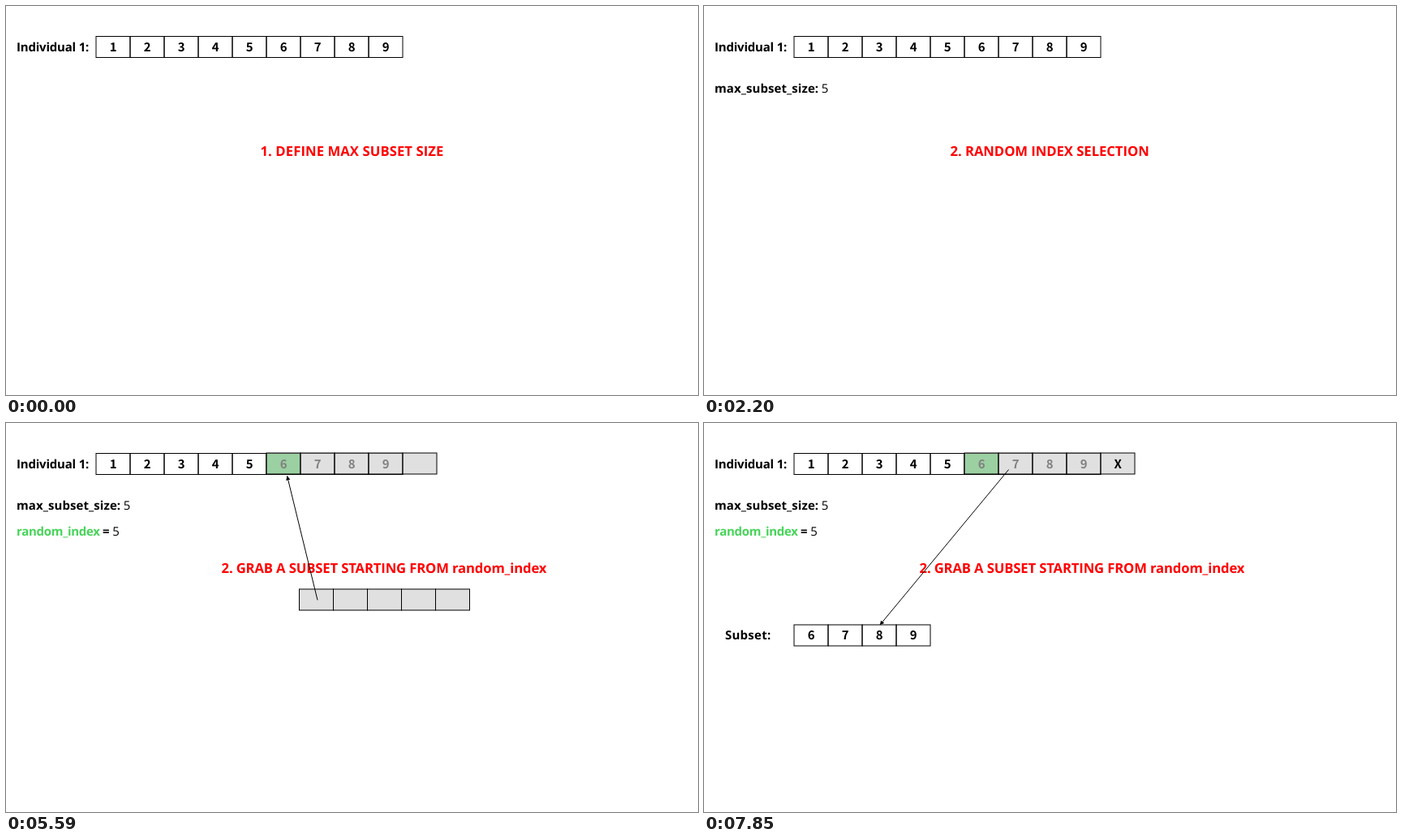
An HTML page that plays this animation: 853 by 480 pixels, repeating every 8 s.

```html
<!DOCTYPE html>
<html lang="en">
<head>
<meta charset="utf-8">
<title>Subset selection</title>
<style>
  html, body { margin: 0; width: 100%; height: 100%; overflow: hidden; background: #fff; }
  svg { display: block; width: 100%; height: 100%; }
  text { font: 700 15px "Open Sans", "Noto Sans", sans-serif; text-rendering: geometricPrecision; }
  .value { font-weight: 400; }
  .digit { font: 700 15px "Noto Sans CJK JP", "Noto Sans CJK SC", "Noto Sans CJK", sans-serif; text-anchor: middle; }
  .title { font-size: 16.7px; fill: #f00; }
  .index { fill: #47d459; letter-spacing: -.3px; }
  .cell { fill: none; stroke: #000; stroke-width: 1; }
  .veil .cell { fill: rgba(206, 206, 206, .627); }
  .arrow { stroke: #000; stroke-width: 1; marker-end: url(#head); }

  .step { visibility: hidden; animation: 8s step-end infinite; }
  .define { animation-name: define; }
  .size { animation-name: size; }
  .random { animation-name: random; }
  .picked { animation-name: picked; }
  .grab { animation-name: grab; }
  .window { animation-name: window; }
  .cover { animation-name: cover; }
  .point { animation-name: point; }
  .overflow { animation-name: overflow; }
  .result { animation-name: result; }

  @keyframes define { 0% { visibility: visible } 27.5%, 100% { visibility: hidden } }
  @keyframes size { 0% { visibility: hidden } 13.375%, 100% { visibility: visible } }
  @keyframes random { 0%, 55.75%, 100% { visibility: hidden } 27.5% { visibility: visible } }
  @keyframes picked { 0% { visibility: hidden } 41.625%, 100% { visibility: visible } }
  @keyframes grab { 0% { visibility: hidden } 55.75%, 100% { visibility: visible } }
  @keyframes window { 0%, 84%, 100% { visibility: hidden } 55.75% { visibility: visible } }
  @keyframes cover { 0% { visibility: hidden } 69.875%, 100% { visibility: visible } }
  @keyframes point { 0%, 84%, 100% { visibility: hidden } 69.875% { visibility: visible } }
  @keyframes overflow { 0% { visibility: hidden } 84%, 100% { visibility: visible } }
  @keyframes result { 0% { visibility: hidden } 98.125%, 100% { visibility: visible } }
</style>
</head>
<body>
<svg viewBox="0 0 853 480">
  <defs>
    <marker id="head" markerUnits="userSpaceOnUse" markerWidth="6" markerHeight="6" refX="5" refY="3" orient="auto">
      <path d="M0 .4L5.4 3L0 5.6z"/>
    </marker>
  </defs>

  <text x="13" y="56" letter-spacing="-.2">Individual 1:</text>
  <rect class="step picked" x="321" y="37.5" width="42" height="26" fill="#47d459"/>
  <g data-row="111 37.5" data-values="123456789"></g>

  <g class="step size">
    <text x="13" y="107" letter-spacing=".08">max_subset_size:</text>
    <text class="value" x="144.8" y="107">5</text>
  </g>
  <g class="step picked">
    <text class="index" x="13" y="139">random_index</text>
    <text x="119" y="139">=</text>
    <text class="value" x="131.3" y="139">5</text>
  </g>

  <text class="title step define" x="313.5" y="185" letter-spacing=".07">1. DEFINE MAX SUBSET SIZE</text>
  <text class="title step random" x="303.5" y="185" letter-spacing="-.06">2. RANDOM INDEX SELECTION</text>
  <text class="title step grab" x="265.5" y="185" letter-spacing="-.15">2. GRAB A SUBSET STARTING FROM random_index</text>

  <g class="veil step window" data-row="361.5 205" data-values="     "></g>
  <g class="veil step cover" data-row="321 37" data-values="     "></g>
  <text class="digit step overflow" x="510.3" y="56">X</text>
  <line class="arrow step point" x1="384" y1="218.5" x2="346.6" y2="65.5"/>

  <g class="step result">
    <text x="26" y="267" letter-spacing=".25">Subset:</text>
    <g data-row="111 249" data-values="6789"></g>
    <line class="arrow" x1="375.5" y1="57.5" x2="217" y2="249"/>
  </g>
</svg>
<script>
  const CELL = { width: 42, height: 26 };

  function add(parent, tag, attributes) {
    const node = document.createElementNS("http://www.w3.org/2000/svg", tag);
    for (const [name, value] of Object.entries(attributes)) node.setAttribute(name, value);
    return parent.appendChild(node);
  }

  for (const row of document.querySelectorAll("[data-row]")) {
    const [left, y] = row.dataset.row.split(" ").map(Number);
    [...row.dataset.values].forEach((value, i) => {
      const x = left + i * CELL.width;
      add(row, "rect", { class: "cell", x, y, ...CELL });
      if (value !== " ") {
        add(row, "text", { class: "digit", x: x + 21.2, y: Math.round(y + 18) }).textContent = value;
      }
    });
  }
</script>
</body>
</html>
```
